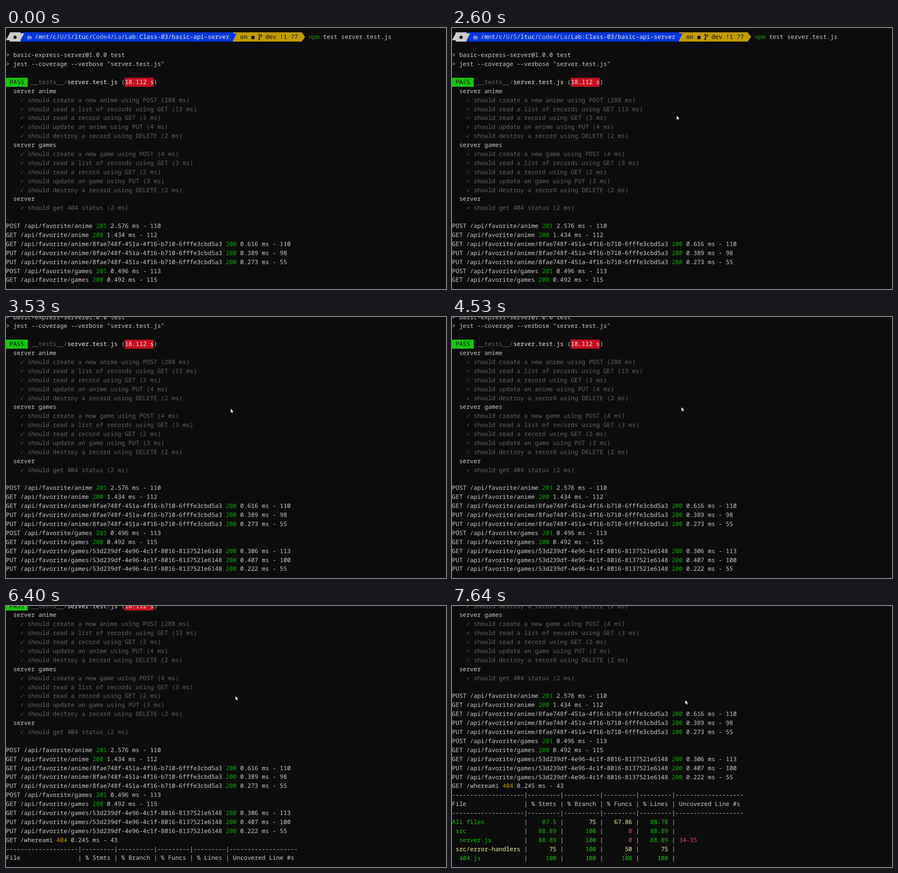
An HTML page that plays this animation: 971x577 px, repeating every 8 s.

```html
<!DOCTYPE html>
<html lang="en">
<head>
<meta charset="utf-8">
<title>Test run</title>
<style>
html, body { margin: 0; width: 100%; height: 100%; overflow: hidden; background: #0c0c0c; }
#view { position: absolute; left: 0; top: 0; width: 971px; height: 567px; overflow: hidden; }
#page { position: absolute; left: 0; }
pre {
  position: relative; margin: 0; color: #ccc;
  font: 13.255px/19.885px "Noto Sans Mono", "DejaVu Sans Mono", monospace;
  font-variant-ligatures: none; text-rendering: geometricPrecision;
}
svg { position: absolute; left: 0; top: 0; overflow: visible; }
i { font-style: normal; }
.ok { position: absolute; color: #13a10e; }
.dim { color: #666; }
.hi { color: #f2f2f2; }
.hi u { color: #b4c0e6; text-decoration: none; }
.ink { color: #0c0c0c; }
.green { color: #13a10e; }
.gold { color: #c19c00; }
.high { color: #16c60c; }
.medium { color: #f9f1a5; }
.low { color: #e74856; }
.pass, .slow { display: inline-block; background: #16c60c; color: #0c0c0c; }
.slow { background: #c50f1f; color: #f2f2f2; }
</style>
</head>
<body>
<div id="view"><div id="page">
  <svg width="971" height="20">
    <path fill="#0037da" d="M32 -.4H501V20H32Z"/>
    <path fill="#c19c00" d="M501 -.4H652.5L660 9.8 652.5 20H501Z"/>
    <path fill="#ccc" d="M0 17 8 2V-.4H32V2H40L32 17V20H8V17Z"/>
    <path fill="#0037da" d="M501 2H509L501 17Z"/>
    <circle cx="20" cy="10.5" r="3.5" fill="#0c0c0c"/>
    <path fill="none" stroke="#f2f2f2" d="M48.5 14V7.5H51L52 8.5H54.5V10.5M48.5 14 50 10.5H56.5L55 14Z"/>
    <rect x="541.5" y="7.5" width="7" height="7" fill="#0c0c0c"/>
    <g fill="none" stroke="#0c0c0c" stroke-width="1.2">
      <path d="M558.8 6V14M563.3 7.5C563.3 11 558.8 9.5 558.8 13"/>
      <circle cx="558.8" cy="5" r="1.3"/><circle cx="558.8" cy="15" r="1.3"/><circle cx="563.3" cy="6.2" r="1.3"/>
    </g>
  </svg>
<pre id="log">
        <i class="hi">/mnt/c/<u>U</u>/<u>S</u>/ltuc/<u>Code4</u>/<u>La</u>/Lab:Class-03/basic-api-server</i>   <i class="ink">on     dev !1 ?7</i>   <i class="green">npm</i> test server.test.js

&gt; basic-express-server@1.0.0 test
&gt; jest --coverage --verbose "server.test.js"

<i class="pass"> PASS </i> <i class="dim">__tests__/</i><i class="hi">server.test.js</i> (<i class="slow">18.112 s</i>)
  server anime
    ✓ should create a new anime using POST (288 ms)
    ✓ should read a list of records using GET (13 ms)
    ✓ should read a record using GET (3 ms)
    ✓ should update an anime using PUT (4 ms)
    ✓ should destroy a record using DELETE (2 ms)
  server games
    ✓ should create a new game using POST (4 ms)
    ✓ should read a list of records using GET (3 ms)
    ✓ should read a record using GET (2 ms)
    ✓ should update an game using PUT (3 ms)
    ✓ should destroy a record using DELETE (2 ms)
  server
    ✓ should get 404 status (2 ms)

POST /api/favorite/anime 201 2.576 ms - 110
GET /api/favorite/anime 200 1.434 ms - 112
GET /api/favorite/anime/8fae748f-451a-4f16-b710-6fffe3cbd5a3 200 0.616 ms - 110
PUT /api/favorite/anime/8fae748f-451a-4f16-b710-6fffe3cbd5a3 200 0.389 ms - 98
PUT /api/favorite/anime/8fae748f-451a-4f16-b710-6fffe3cbd5a3 200 0.273 ms - 55
POST /api/favorite/games 201 0.496 ms - 113
GET /api/favorite/games 200 0.492 ms - 115
GET /api/favorite/games/53d239df-4e96-4c1f-8016-8137521e6148 200 0.306 ms - 113
PUT /api/favorite/games/53d239df-4e96-4c1f-8016-8137521e6148 200 0.407 ms - 100
PUT /api/favorite/games/53d239df-4e96-4c1f-8016-8137521e6148 200 0.222 ms - 55
GET /whereami 404 0.245 ms - 43
--------------------|---------|----------|---------|---------|-------------------
File                | % Stmts | % Branch | % Funcs | % Lines | Uncovered Line #s
--------------------|---------|----------|---------|---------|-------------------
All files           |    87.5 |       75 |   67.86 |   88.78 |
 src                |   88.89 |      100 |       0 |   88.89 |
  server.js         |   88.89 |      100 |       0 |   88.89 | 34-35
 src/error-handlers |      75 |      100 |      50 |      75 |
  404.js            |     100 |      100 |     100 |     100 |
</pre>
</div></div>
<svg id="mouse" width="6" height="10"><path fill="#fff" d="M0 0V8.2L1.9 6.5 3.2 9.6 4.6 9 3.3 6H5.9Z"/></svg>
<script>
const LOOP = 8000, STEP = 77.5, LINE = 19.885, TOP = 10.4;
const [page, log, mouse] = ['page', 'log', 'mouse'].map(id => document.getElementById(id));
const tag = (cls, text) => `<i class="${cls}">${text}</i>`;
const level = percent => percent >= 80 ? 'high' : percent >= 50 ? 'medium' : 'low';

// Colours a coverage row by its percentages, the file name by the first of them
function paintRow(line) {
  const [name, ...cells] = line.split('|');
  const missed = cells.pop();
  return [tag(level(cells[0]), name), ...cells.map(c => tag(level(c), c)), tag('low', missed)].join('|');
}

function paint(line) {
  if (/\| +[\d.]+ \|/.test(line)) return paintRow(line);
  return line
    .replace(/✓ (.*)/, (_, text) => tag('ok', '✓') + '  ' + tag('dim', text))
    .replace(/ (\d{3}) (?=[\d.]+ ms)/, (_, code) => ` ${tag(code < 400 ? 'green' : 'gold', code)} `);
}
log.innerHTML = log.innerHTML.split('\n').map(paint).join('\n');

// Each wheel click scrolls three lines
const clicks = [3380, 5470, 6630, 7560];

// Pointer moves: start, end, x, y
const moves = [
  [120, 430, 612, 253], [510, 820, 639, 243], [970, 1890, 477, 184], [2210, 2600, 496, 194],
  [3300, 3530, 496, 203], [3530, 4150, 479, 210], [4150, 4450, 506.5, 199.5], [6860, 7330, 515, 208.5]
];

function pointer(t) {
  let x = 867, y = 501;
  for (const [start, end, toX, toY] of moves) {
    const k = Math.min(1, Math.max(0, (t - start) / (end - start)));
    const ease = k * k * (3 - 2 * k);
    x += (toX - x) * ease;
    y += (toY - y) * ease;
  }
  return [x, y];
}

function draw(now) {
  const t = now % LOOP;
  const lines = 3 * clicks.filter(c => t >= c).length;
  page.style.top = TOP - lines * LINE + 'px';

  // The pointer is sampled at a fixed rate
  const n = Math.floor((t - 112) / STEP);
  const [x, y] = pointer(120 + n * STEP);
  mouse.style.display = n < 0 ? 'none' : '';
  mouse.style.transform = `translate(${x}px, ${y}px)`;
  requestAnimationFrame(draw);
}
requestAnimationFrame(draw);
</script>
</body>
</html>
```
